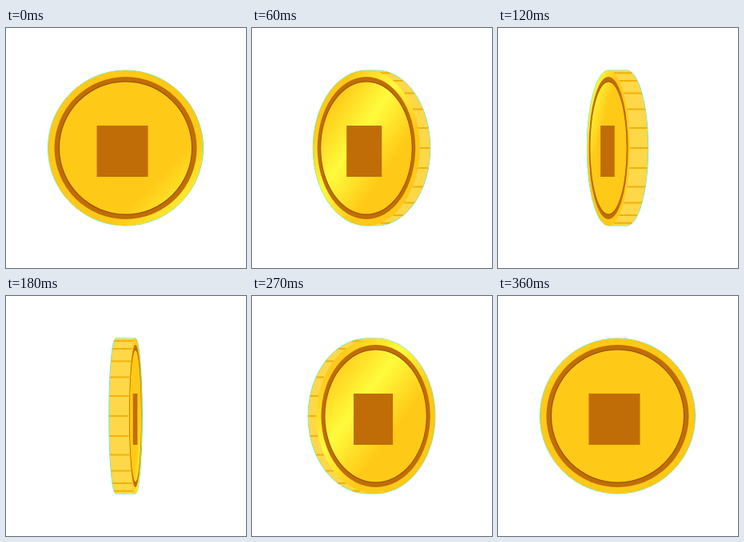
An HTML page with a canvas for the animation above (450 ms loop, 300 by 300 pixels).

```html
<!DOCTYPE html>
<html lang="en">
<head>
<meta charset="utf-8">
<title>Spinning coin</title>
<style>
  html, body { margin: 0; width: 100%; height: 100%; overflow: hidden; background: #fff; }
  canvas { display: block; }
</style>
</head>
<body>
<canvas id="stage" width="300" height="300"></canvas>
<script>
const ctx = document.getElementById("stage").getContext("2d");
const LOOP = 450, STEP = 30;
const CX = 149.5, CY = 150, RADIUS = 97, HALF_THICKNESS = 12.4;
const GOLD = "#ffc917", SHINE = "#fffb3c", BRONZE = "#c06d07";
// Turn in degrees at each step; the last one is held until the loop restarts
const TURN = [0, 23, 46.5, 62, 74, 84.5, 95, 106, 120, 140, 158, 172, 180];

function disc(radius, fill) {
  ctx.beginPath();
  ctx.arc(0, 0, radius, 0, Math.PI * 2);
  ctx.fillStyle = fill;
  ctx.fill();
}

// Gold with a diagonal streak of light centred at the given distance from the middle
function shinyGold(distance) {
  const near = (distance - 65) * Math.SQRT1_2, far = (distance + 65) * Math.SQRT1_2;
  const g = ctx.createLinearGradient(near, near, far, far);
  g.addColorStop(0, GOLD);
  g.addColorStop(0.5, SHINE);
  g.addColorStop(1, GOLD);
  return g;
}

function outline(rx, depth) {
  const q = Math.PI / 2;
  ctx.beginPath();
  ctx.ellipse(CX + depth, CY, rx, RADIUS, 0, -q, q);
  ctx.ellipse(CX - depth, CY, rx, RADIUS, 0, q, 3 * q);
  ctx.closePath();
}

function drawEdge(rx, depth, side) {
  ctx.fillStyle = "#ffd84a";
  ctx.fill();
  ctx.strokeStyle = "#f0b208";
  ctx.lineWidth = 2;
  for (let deg = -75; deg <= 75; deg += 15) {
    const a = deg * Math.PI / 180;
    const x = CX - side * rx * Math.cos(a), y = CY + RADIUS * Math.sin(a);
    ctx.beginPath();
    ctx.moveTo(x - depth, y);
    ctx.lineTo(x + depth, y);
    ctx.stroke();
  }
}

function drawFace(x, squash, shine) {
  const gold = shinyGold(shine);
  ctx.translate(x, CY);
  ctx.scale(squash, 1);
  disc(RADIUS, gold);
  disc(89, BRONZE);
  disc(83.5, "#8f4e04");
  disc(82.5, gold);
  ctx.fillStyle = BRONZE;
  ctx.fillRect(-36, -28, 64, 64);
}

function draw(time) {
  const step = Math.min(Math.floor(time % LOOP / STEP), TURN.length - 1);
  const turn = TURN[step], angle = turn * Math.PI / 180;
  const side = turn < 90 ? -1 : 1;
  const squash = Math.abs(Math.cos(angle));
  const rx = RADIUS * squash, depth = HALF_THICKNESS * Math.sin(angle) ** 2;
  const shine = 3 * (40 - (turn < 90 ? turn : turn - 90));

  ctx.clearRect(0, 0, 300, 300);
  outline(rx, depth);
  ctx.lineWidth = 1;
  ctx.strokeStyle = "#45e8d2";
  ctx.stroke();

  ctx.save();
  ctx.clip();
  drawEdge(rx, depth, side);
  drawFace(CX + side * depth, squash, shine);
  ctx.restore();
}

function tick() {
  draw(performance.now());
  requestAnimationFrame(tick);
}
tick();
</script>
</body>
</html>
```
